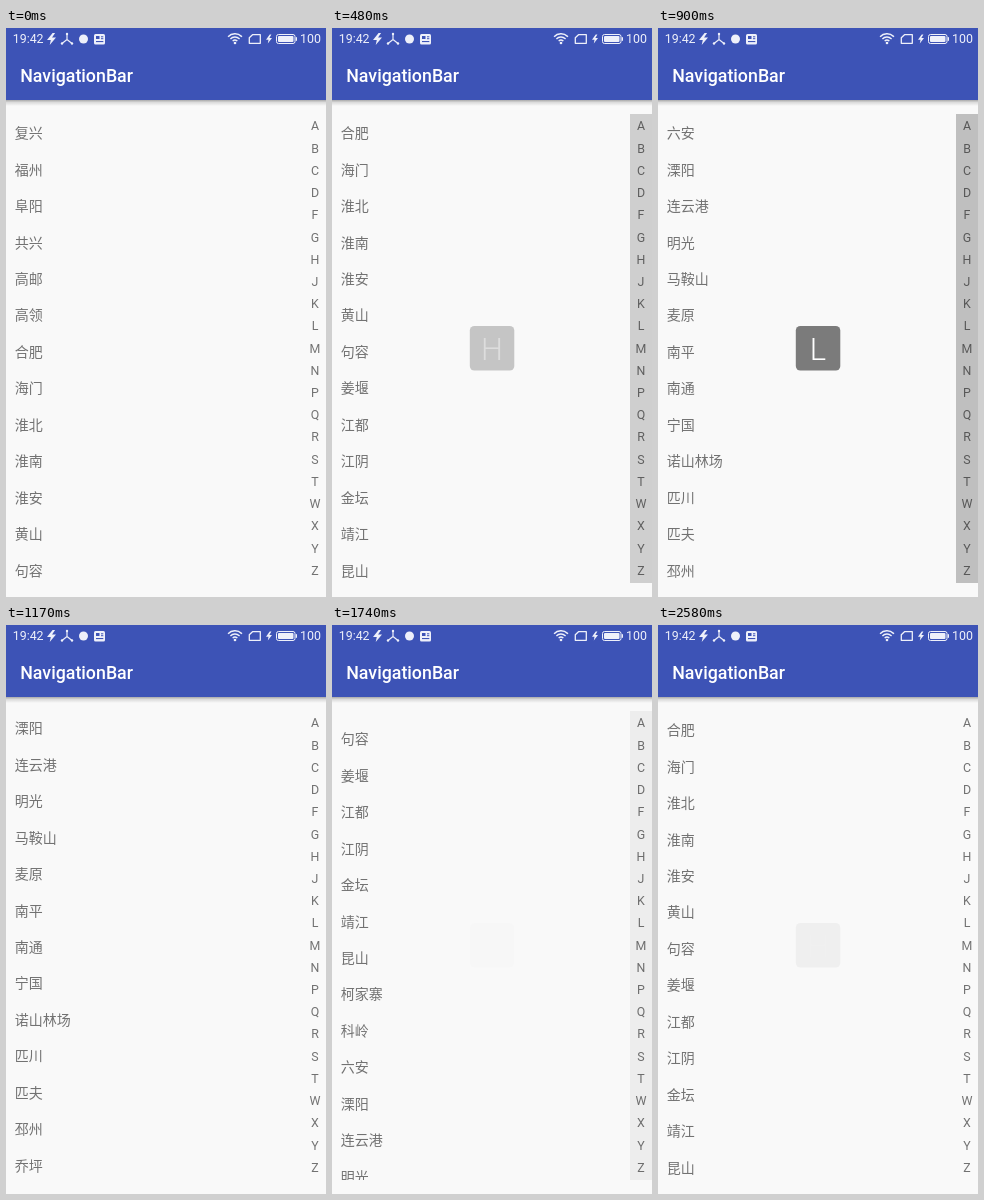
An HTML page with a canvas that plays this animation: 320x569 px, repeating every 2.64 s.

```html
<!DOCTYPE html>
<html lang="zh-CN">
<head>
<meta charset="utf-8">
<style>
  html, body { margin: 0; width: 100%; height: 100%; overflow: hidden; background: #f9f9f9; }
  canvas { display: block; width: 100vw; height: 100vh; }
</style>
</head>
<body>
<canvas id="stage"></canvas>
<script>
const W = 320, H = 569, LOOP = 2640, STEP = 30;
const FADE = 180, BADGE_LAG = 36;
const ROW = 36.45, LIST_TOP = 86, LIST_BOTTOM = 555;
const LETTERS = 'ABCDFGHJKLMNPQRSTWXYZ';
const PLACES = ('复兴 福州 阜阳 共兴 高邮 高领 合肥 海门 淮北 淮南 淮安 黄山 句容 姜堰 江都 江阴 金坛 靖江 ' +
  '昆山 柯家寨 科岭 六安 溧阳 连云港 明光 马鞍山 麦原 南平 南通 宁国 诺山林场 匹川 匹夫 邳州 乔坪 启东 ' +
  '启航 旗舰 如果 如皋 如阳 三明 宿州').split(' ');
const FIRST_ROW = { F: 0, G: 3, H: 6, J: 12, K: 18, L: 21 };

// [time, letter under the finger]
const TOUCHES = [[0, 'F'], [400, 'G'], [440, 'H'], [650, 'J'], [740, 'K'], [820, 'L'],
  [1680, 'J'], [1840, 'K'], [1890, 'L'], [2260, 'K'], [2300, 'J'], [2350, 'H']];
// [finger down, finger up]
const PRESSES = [[364, 910], [1688, 1964], [2200, 2396]];
// [time, top row] while the list is scrolled by hand
const GLIDE = [[1110, 21], [1380, 29.99], [1440, 29.99], [1670, 11.75], [1755, 11.75]];

const canvas = document.getElementById('stage');
const ctx = canvas.getContext('2d');

const clamp = x => Math.max(0, Math.min(1, x));
const ease = x => (1 - Math.cos(Math.PI * clamp(x))) / 2;

function pressAlpha(t) {
  return PRESSES.reduce((sum, [down, up]) =>
    sum + ease((t - down) / FADE) - ease((t - up) / FADE), 0);
}

function touchedLetter(t) {
  return TOUCHES.filter(([start]) => start <= t).pop()[1];
}

function topRow(t) {
  for (let i = 1; i < GLIDE.length; i++) {
    const [t0, a] = GLIDE[i - 1], [t1, b] = GLIDE[i];
    if (t >= t0 && t < t1) return a + (b - a) * ease((t - t0) / (t1 - t0));
  }
  return FIRST_ROW[touchedLetter(t)];
}

function text(str, x, y, font, color, align = 'left') {
  ctx.font = font;
  ctx.fillStyle = color;
  ctx.textAlign = align;
  ctx.fillText(str, x, y);
}

function path(points, close = true) {
  ctx.beginPath();
  points.forEach(([x, y]) => ctx.lineTo(x, y));
  if (close) ctx.closePath();
}

function roundRect(x, y, w, h, r) {
  ctx.beginPath();
  ctx.roundRect(x, y, w, h, r);
}

function bolt(x, y, w, h) {
  path([[.62, 0], [0, .58], [.42, .58], [.3, 1], [1, .38], [.56, .38], [.9, 0]]
    .map(([u, v]) => [x + u * w, y + v * h]));
  ctx.fill();
}

function drawStatusBar() {
  const white = '#eef0fa', blue = '#3d53b6', font = '12.4px Roboto, sans-serif';
  text('19:42', 6.7, 15.4, font, white);
  text('100', 294, 15.4, font, white);
  ctx.fillStyle = ctx.strokeStyle = white;
  ctx.lineWidth = 1.2;

  bolt(41, 5, 9, 12);
  for (const [x, y] of [[61, 6], [56, 15.5], [66, 15.5]]) {
    path([[61, 11.5], [x, y]], false);
    ctx.stroke();
    ctx.beginPath();
    ctx.arc(x, y, 1.2, 0, 7);
    ctx.fill();
  }
  ctx.beginPath();
  ctx.arc(77.5, 11, 4.5, 0, 7);
  ctx.fill();

  roundRect(88, 6, 11, 10.5, 1.5);
  ctx.fill();
  ctx.fillStyle = blue;
  ctx.fillRect(90, 8, 3.5, 3);
  ctx.fillRect(95, 8.3, 2.3, 1);
  ctx.fillRect(95, 10.2, 2.3, 1);
  ctx.fillRect(90, 13, 7.3, 1.1);

  ctx.fillStyle = white;
  ctx.lineWidth = 1.4;
  for (const r of [9.5, 6.3, 3.2]) {
    ctx.beginPath();
    ctx.arc(229, 15.3, r, -Math.PI * .76, -Math.PI * .24);
    ctx.stroke();
  }
  ctx.beginPath();
  ctx.arc(229, 15, 1.3, 0, 7);
  ctx.fill();

  ctx.lineWidth = 1.3;
  ctx.lineJoin = 'round';
  path([[246.5, 6.7], [254.3, 6.7], [254.3, 15.3], [243.3, 15.3], [243.3, 9.8]]);
  ctx.stroke();
  bolt(260, 6.5, 6, 9);

  ctx.lineWidth = 1;
  roundRect(270.5, 6.5, 18.5, 9, 2);
  ctx.stroke();
  roundRect(272, 8, 15.5, 6, 1);
  ctx.fill();
  ctx.fillRect(289.7, 9.2, 1.3, 3.6);
}

function drawHeader() {
  const shadow = ctx.createLinearGradient(0, 72, 0, 78);
  shadow.addColorStop(0, 'rgba(0,0,0,.32)');
  shadow.addColorStop(.4, 'rgba(0,0,0,.12)');
  shadow.addColorStop(1, 'rgba(0,0,0,0)');
  ctx.fillStyle = shadow;
  ctx.fillRect(0, 72, W, 6);
  ctx.fillStyle = '#3d53b6';
  ctx.fillRect(0, 0, W, 72);
  text('NavigationBar', 14.2, 54, '500 17.8px Roboto, sans-serif', '#fff');
  drawStatusBar();
}

function drawList(top) {
  ctx.save();
  ctx.beginPath();
  ctx.rect(0, LIST_TOP, W, LIST_BOTTOM - LIST_TOP);
  ctx.clip();
  PLACES.forEach((place, i) => {
    const y = 110.2 + (i - top) * ROW;
    if (y > 60 && y < H + 20) {
      text(place, 8.8, y, '14px "Noto Sans CJK SC", "Noto Sans CJK", sans-serif', '#727272');
    }
  });
  ctx.restore();
}

function drawIndex(alpha) {
  ctx.fillStyle = `rgba(0,0,0,${.235 * alpha})`;
  ctx.fillRect(298, LIST_TOP, 22, LIST_BOTTOM - LIST_TOP);
  [...LETTERS].forEach((letter, i) =>
    text(letter, 309, 102.4 + i * 22.22, '12.4px Roboto, sans-serif', 'rgba(0,0,0,.54)', 'center'));
}

function drawBadge(letter, alpha) {
  if (alpha <= 0) return;
  ctx.globalAlpha = alpha;
  ctx.fillStyle = 'rgba(0,0,0,.505)';
  roundRect(137.8, 298, 44.5, 44.5, 4.5);
  ctx.fill();
  text(letter, 160, 332.3, '300 31px Roboto, sans-serif', '#fff', 'center');
  ctx.globalAlpha = 1;
}

function draw(t) {
  ctx.fillStyle = '#f9f9f9';
  ctx.fillRect(0, 0, W, H);
  drawList(topRow(t));
  drawIndex(clamp(pressAlpha(t)));
  drawBadge(touchedLetter(t), clamp(pressAlpha(t - BADGE_LAG)));
  drawHeader();
}

function frame() {
  const scale = window.devicePixelRatio || 1;
  const width = Math.round(innerWidth * scale), height = Math.round(innerHeight * scale);
  if (canvas.width !== width || canvas.height !== height) {
    canvas.width = width;
    canvas.height = height;
  }
  ctx.setTransform(width / W, 0, 0, height / H, 0, 0);
  const t = performance.now() % LOOP;
  draw(Math.min(Math.floor(t / STEP) * STEP, LOOP - 2 * STEP));
  requestAnimationFrame(frame);
}
frame();
</script>
</body>
</html>
```
